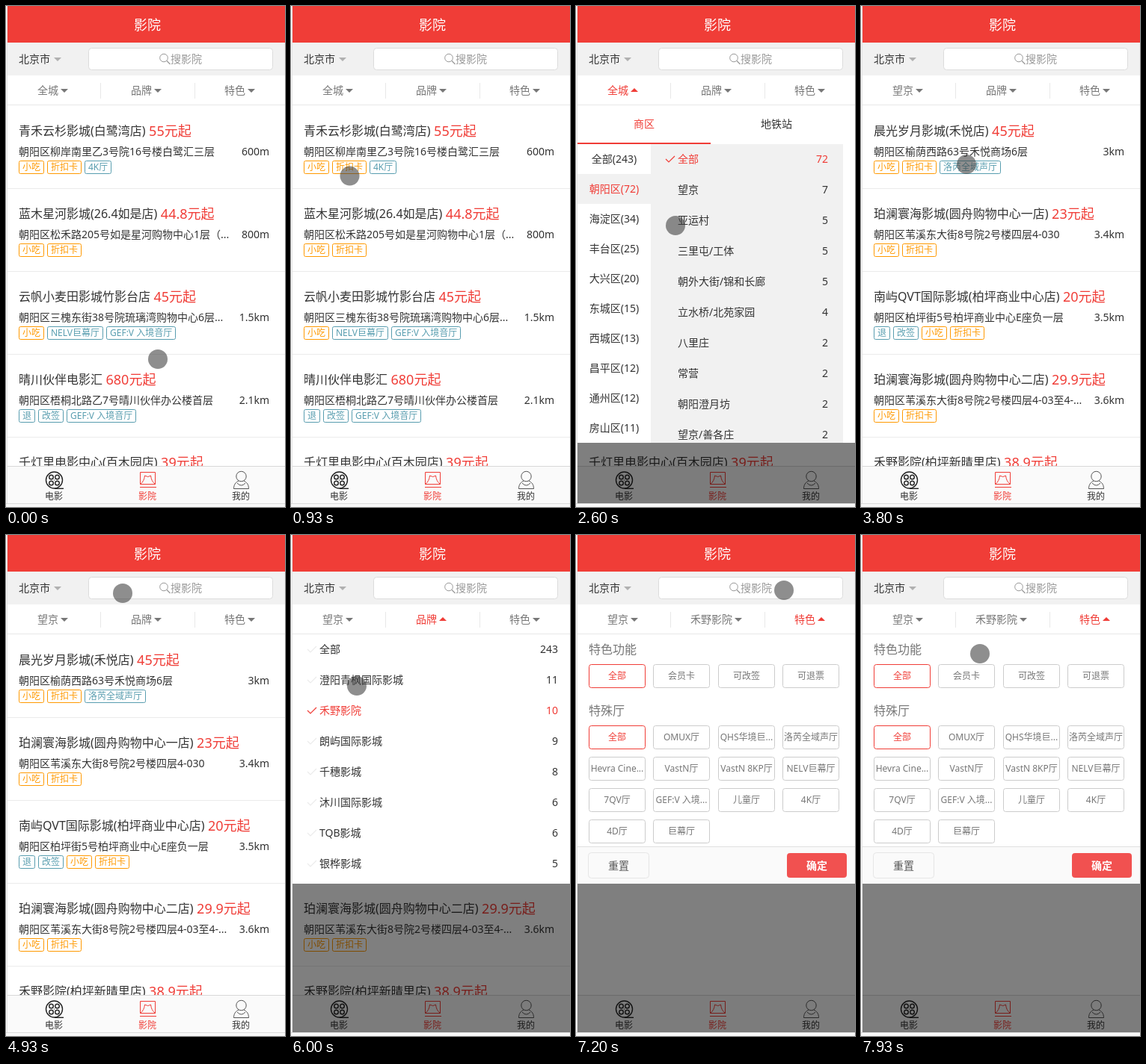
An HTML page with a canvas that plays this animation: 373 px wide and 671 px high, repeating every 8 s.

```html
<!DOCTYPE html>
<html lang="zh-CN">
<head>
<meta charset="utf-8">
<title>影院</title>
<style>
html, body { margin: 0; width: 100%; height: 100%; overflow: hidden; background: #fff; }
canvas { display: block; width: 373px; height: 671px; }
</style>
</head>
<body>
<canvas id="stage"></canvas>
<script>
const W = 373, H = 671, LOOP = 8000, LEFT = 2, BOTTOM = 666;
const RED = '#f03d37', INK = '#333', MUTED = '#777', PALE = '#f1f1f1';
const FONT = '"Noto Sans", "Open Sans", "Noto Sans CJK SC", "Noto Sans CJK", sans-serif';

const canvas = document.getElementById('stage');
const ctx = canvas.getContext('2d');
const dpr = window.devicePixelRatio || 1;
canvas.width = W * dpr;
canvas.height = H * dpr;
ctx.scale(dpr, dpr);

// name, price, address, distance, tags
const cityCinemas = [
  ['青禾云杉影城(白鹭湾店)', '55', '朝阳区柳岸南里乙3号院16号楼白鹭汇三层', '600m', '小吃,折扣卡,4K厅'],
  ['蓝木星河影城(26.4如是店)', '44.8', '朝阳区松禾路205号如是星河购物中心1层（...', '800m', '小吃,折扣卡'],
  ['云帆小麦田影城竹影台店', '45', '朝阳区三槐东街38号院琉璃湾购物中心6层...', '1.5km', '小吃,NELV巨幕厅,GEF:V 入境音厅'],
  ['晴川伙伴电影汇', '680', '朝阳区梧桐北路乙7号晴川伙伴办公楼首层', '2.1km', '退,改签,GEF:V 入境音厅'],
  ['千灯里电影中心(百木园店)', '39', '', '', '']
];
const areaCinemas = [
  ['晨光岁月影城(禾悦店)', '45', '朝阳区榆荫西路63号禾悦商场6层', '3km', '小吃,折扣卡,洛芮全域声厅'],
  ['珀澜寰海影城(圆舟购物中心一店)', '23', '朝阳区苇溪东大街8号院2号楼四层4-030', '3.4km', '小吃,折扣卡'],
  ['南屿QVT国际影城(柏坪商业中心店)', '20', '朝阳区柏坪街5号柏坪商业中心E座负一层', '3.5km', '退,改签,小吃,折扣卡'],
  ['珀澜寰海影城(圆舟购物中心二店)', '29.9', '朝阳区苇溪东大街8号院2号楼四层4-03至4-...', '3.6km', '小吃,折扣卡'],
  ['禾野影院(柏坪新晴里店)', '38.9', '朝阳区柏坪街11号新晴里商场4层', '3.7km', '小吃,折扣卡']
];
const brandCinemas = areaCinemas.slice(4);

const districts = ['全部(243)', '朝阳区(72)', '海淀区(34)', '丰台区(25)', '大兴区(20)',
  '东城区(15)', '西城区(13)', '昌平区(12)', '通州区(12)', '房山区(11)'];
const areas = [['全部', 72], ['望京', 7], ['亚运村', 5], ['三里屯/工体', 5], ['朝外大街/锦和长廊', 5],
  ['立水桥/北苑家园', 4], ['八里庄', 2], ['常营', 2], ['朝阳澄月坊', 2], ['望京/善各庄', 2]];
const brands = [['全部', 243], ['澄阳青枫国际影城', 11], ['禾野影院', 10], ['朗屿国际影城', 9],
  ['千穗影城', 8], ['沐川国际影城', 6], ['TQB影城', 6], ['银桦影城', 5]];
const services = ['全部', '会员卡', '可改签', '可退票'];
const halls = ['全部', 'OMUX厅', 'QHS华境巨...', '洛芮全域声厅', 'Hevra Cine...', 'VastN厅', 'VastN 8KP厅',
  'NELV巨幕厅', '7QV厅', 'GEF:V 入境...', '儿童厅', '4K厅', '4D厅', '巨幕厅'];

// tick, x, y at 15 ticks per second
const pointerKeys = [
  [0, 203, 473], [1, 147, 424], [4, 147, 424], [5, 151, 430], [7, 151, 430], [20, 21, 67],
  [23, 21, 67], [29, 24, 214], [30, 24, 214], [31, 19, 219], [34, 19, 219], [39, 133, 294],
  [45, 141, 212], [66, 141, 212], [74, 156, 78], [79, 156, 78], [85, 84, 204], [87, 84, 204],
  [90, 88, 202], [97, 88, 202], [98, 85, 205], [105, 278, 74], [111, 278, 74], [119, 159, 159]
];

function rect(x, y, w, h, color) {
  ctx.fillStyle = color;
  ctx.fillRect(x, y, w, h);
}

// y is the vertical middle of the glyphs
function text(s, x, y, size, color, align = 'left', weight = 400) {
  ctx.font = `${weight} ${size}px ${FONT}`;
  ctx.fillStyle = color;
  ctx.textAlign = align;
  ctx.fillText(s, x, Math.round(y + size * 0.37));
  return ctx.measureText(s).width;
}

function stroke(color, width = 1) {
  ctx.strokeStyle = color;
  ctx.lineWidth = width;
  ctx.stroke();
}

function box(x, y, w, h, r, border, fill) {
  ctx.beginPath();
  ctx.roundRect(x + 0.5, y + 0.5, w - 1, h - 1, r);
  if (fill) { ctx.fillStyle = fill; ctx.fill(); }
  stroke(border);
}

function line(d, color, width = 1) {
  ctx.lineWidth = width;
  ctx.strokeStyle = color;
  ctx.stroke(new Path2D(d));
}

function ring(x, y, r, color, width) {
  ctx.beginPath();
  ctx.arc(x, y, r, 0, Math.PI * 2);
  stroke(color, width);
}

function caret(x, y, color, up) {
  const s = up ? -1 : 1;
  ctx.fillStyle = color;
  ctx.beginPath();
  ctx.moveTo(x, y - 2.5 * s);
  ctx.lineTo(x + 10, y - 2.5 * s);
  ctx.lineTo(x + 5, y + 2.5 * s);
  ctx.fill();
}

function check(x, y, color) {
  line(`M${x - 6} ${y} l4 4 l8 -8`, color, 1.2);
}

function header() {
  rect(LEFT, 0, W, 49, RED);
  text('影院', 189, 25, 18, '#fff', 'center');
  rect(LEFT, 49, W, 44, PALE);
  text('北京市', 17, 71, 14, INK);
  caret(64, 71.5, '#b0b0b0');
  box(110, 56, 247, 30, 4, '#dcdcdc', '#fff');
  ring(211, 69.5, 5.3, '#999');
  line('M215 73.5 L219.5 78', '#999', 1.2);
  text('搜影院', 220, 71, 14, '#999');
}

function filters(labels, open) {
  rect(LEFT, 93, W, 39, '#fff');
  rect(LEFT, 132, W, 1, '#e8e8e8');
  labels.forEach((label, i) => {
    const active = i === open, color = active ? RED : MUTED;
    const x = Math.round(62.5 + 125.2 * i - (label.length * 14 + 13) / 2);
    const w = text(label, x, 113, 14, color);
    caret(x + w + 3, active ? 112.5 : 113.5, color, active);
  });
  rect(126, 103, 1, 21, '#e8e8e8');
  rect(252, 103, 1, 21, '#e8e8e8');
}

function tag(label, x, y) {
  const color = /小吃|折扣卡/.test(label) ? '#ff9900' : '#589daf';
  const w = Math.floor(text(label, x + 5, y + 9, 12, color, 'left', 500)) + 10;
  box(x, y, w, 18, 2, color);
  return w;
}

function cinemaList(rows) {
  rect(LEFT, 133, W, 483, '#fff');
  rows.forEach(([name, price, address, distance, tags], i) => {
    const y = 133 + 111 * i;
    const w = text(name, 17, y + 34, 16, INK);
    text(price + '元起', 17 + w + 4.5, y + 34, 18, RED);
    text(address, 17, y + 62, 14, INK);
    text(distance, 352, y + 62, 14, INK, 'right');
    let x = 17;
    if (tags) for (const label of tags.split(',')) x += tag(label, x, y + 74) + 4;
    rect(LEFT, y + 111, W, 1, '#ebebeb');
  });
}

function tabBar() {
  rect(LEFT, 616, W, 50, '#fafafa');
  rect(LEFT, 616, W, 1, '#d8d8d8');
  ring(64.5, 635, 11, '#222', 1.4);
  for (const dx of [-4, 4]) for (const dy of [-4, 4]) ring(64.5 + dx, 635 + dy, 2.8, '#222', 1.4);
  rect(64, 634.5, 1, 1, '#222');
  line('M65 646.3 H77', '#222', 1.4);
  line('M179 644.5 H201 M179.5 640.5 V624.5 H199.5 V640.5', RED);
  line('M179.5 640.5 C183 638 185 634 185.5 629 Q190 632 193.5 629 C194 634 196 638 199.5 640.5 Z', RED);
  ring(314.5, 630, 6.7, '#555');
  line('M311 636 C307 638 304.5 641 304.5 646.5 H324.5 C324.5 641 322 638 318 636 M309 639 Q314.5 645 320 639', '#555');
  text('电影', 64, 657, 12, INK, 'center');
  text('影院', 189, 657, 12, RED, 'center');
  text('我的', 314, 657, 12, INK, 'center');
}

function sheet(bottom) {
  rect(LEFT, bottom, W, BOTTOM - bottom, 'rgba(0,0,0,.5)');
  rect(LEFT, 133, W, bottom - 133, '#fff');
}

function option([label, count], x, right, y, on, idleMark) {
  const color = on ? RED : INK;
  if (on || idleMark) check(x - 10, y, on ? RED : idleMark);
  text(label, x, y, 14, color);
  text(count, right, y, 14, color, 'right');
}

function areaPanel(district, area) {
  sheet(585);
  text('商区', 91, 158, 14, RED, 'center');
  text('地铁站', 268, 158, 14, INK, 'center');
  rect(100, 185, 257, 400, PALE);
  rect(LEFT, 183, 178, 2, RED);
  districts.forEach((label, i) => {
    const on = i === district;
    if (on) rect(LEFT, 185 + 40 * i, 98, 40, PALE);
    text(label, 51, 205 + 40 * i, 14, on ? RED : INK, 'center');
  });
  if (district === 1) areas.forEach((row, i) => option(row, 136, 337, 205 + 41 * i, i === area));
}

function brandPanel(selected) {
  sheet(467);
  brands.forEach((row, i) => option(row, 38, 357, 153 + 41 * i, i === selected, '#ebebeb'));
}

function chips(labels, top) {
  labels.forEach((label, i) => {
    const x = Math.round(17 + 86.4 * (i % 4)), y = top + 42 * Math.floor(i / 4);
    box(x, y, 76, 32, 3, i ? '#ccc' : RED);
    text(label, x + 38, y + 16, 12, i ? MUTED : RED, 'center');
  });
}

function featurePanel() {
  sheet(467);
  text('特色功能', 17, 153, 16, MUTED);
  chips(services, 173);
  text('特殊厅', 17, 235, 16, MUTED);
  chips(halls, 255);
  rect(LEFT, 417, W, 50, '#fafafa');
  rect(LEFT, 417, W, 1, '#e0e0e0');
  box(16, 425, 82, 35, 4, '#e6e6e6');
  text('重置', 57, 443, 14, '#555', 'center');
  box(282, 426, 80, 33, 3, '#f15150', '#f15150');
  text('确定', 322, 443, 14, '#fff', 'center', 700);
}

function pointer(tick) {
  const next = pointerKeys.findIndex(k => k[0] > tick);
  const b = pointerKeys[next < 0 ? pointerKeys.length - 1 : next];
  const a = next < 0 ? b : pointerKeys[next - 1];
  const p = a === b ? 0 : (tick - a[0]) / (b[0] - a[0]);
  const e = p * p * (3 - 2 * p);
  ctx.fillStyle = 'rgba(60,60,60,.58)';
  ctx.beginPath();
  ctx.arc(a[1] + (b[1] - a[1]) * e, a[2] + (b[2] - a[2]) * e, 13, 0, Math.PI * 2);
  ctx.fill();
}

function draw(ms) {
  const tick = Math.floor((ms % LOOP + 5) * 0.015);
  const open = tick >= 108 ? 2 : tick >= 77 && tick < 94 ? 1 : tick >= 22 && tick < 57 ? 0 : -1;
  rect(0, 0, W, H, '#fff');
  cinemaList(tick < 57 ? cityCinemas : tick < 94 ? areaCinemas : brandCinemas);
  header();
  filters([tick < 57 ? '全城' : '望京', tick < 94 ? '品牌' : '禾野影院', '特色'], open);
  tabBar();
  if (open === 0) areaPanel(tick < 34 ? 0 : 1, tick < 47 ? 0 : 1);
  if (open === 1) brandPanel(tick < 88 ? 0 : 2);
  if (open === 2) featurePanel();
  rect(0, BOTTOM, W, H - BOTTOM, '#f8f8f8');
  rect(0, BOTTOM, W, 1, '#dcdcdc');
  rect(1, 0, 1, BOTTOM, '#e2e2e2');
  pointer(tick);
}

const start = performance.now();
function loop() {
  draw(performance.now() - start);
  requestAnimationFrame(loop);
}
loop();
</script>
</body>
</html>
```
